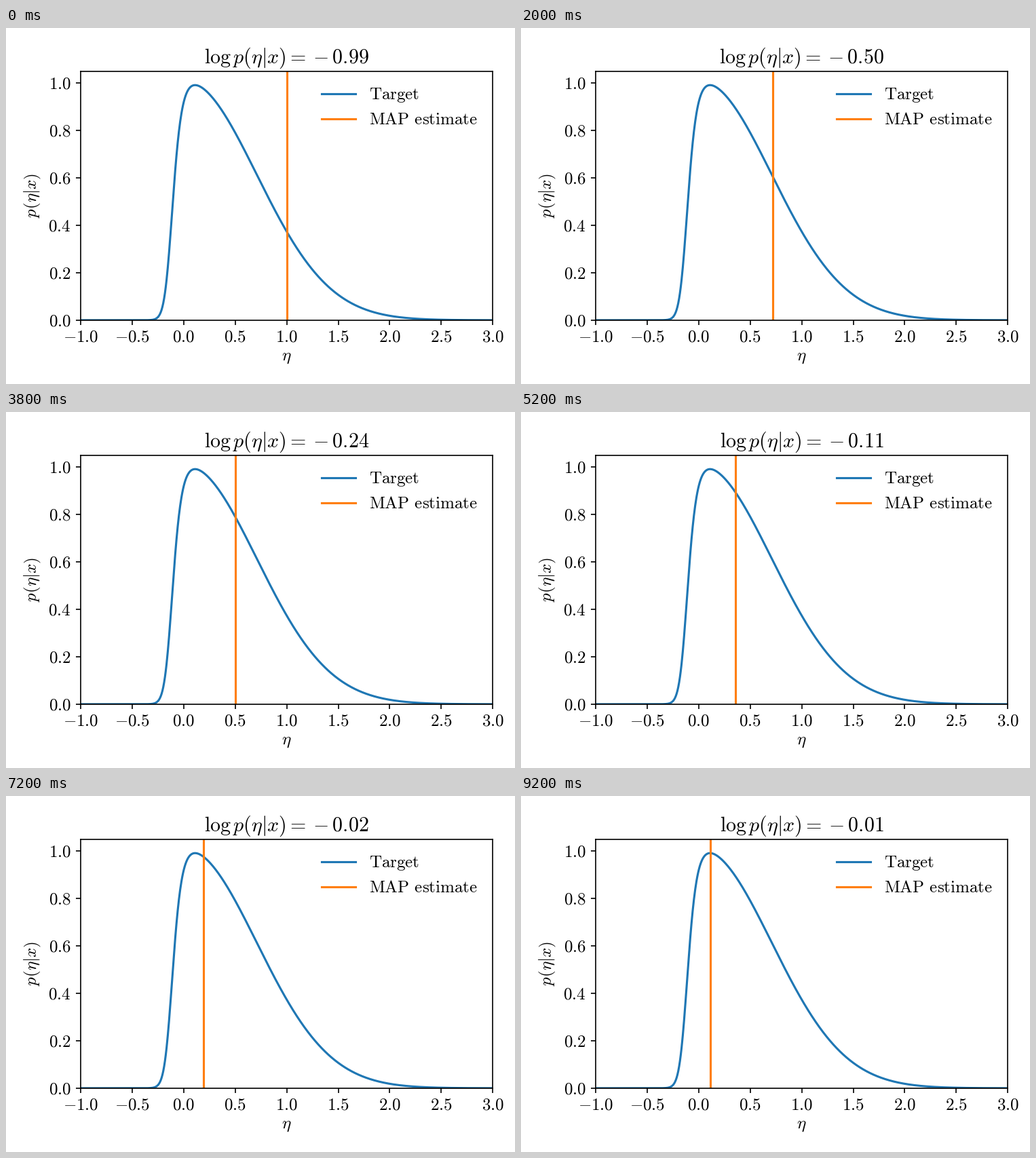
Animation of 750x525 px, one loop 10000 ms. Source, as a matplotlib script:

```python
import numpy as np
import matplotlib.pyplot as plt
from matplotlib.animation import FuncAnimation
from matplotlib.ticker import FormatStrFormatter, MultipleLocator

W, H, DPI = 750, 525, 150
FRAMES, INTERVAL = 50, 200
LEFT, RIGHT, TOP, BOTTOM = 110.2, 717.2, 63.8, 430.9

plt.rcParams.update({
    "font.family": "Liberation Serif",
    "font.size": 12,
    "mathtext.fontset": "cm",
})


def density(eta):
    """Unnormalised posterior: Gaussian prior times a squared sigmoid."""
    return np.exp(-eta**2) / (1 + np.exp(-(20 * eta + 3)))**2


grid = np.linspace(-1.5, 6, 7501)
NORM = density(grid).sum() * (grid[1] - grid[0])

# Optimiser trajectory: step number and estimate
STEPS = np.array([0, 4, 6, 10, 19, 24, 26, 36, 42, 44, 46, 49])
VALUES = np.array([1, .8835, .826, .718, .501, .396, .3555, .1915,
                   .133, .12, .1135, .1105])
SLOPES = np.gradient(VALUES, STEPS)


def estimate(k):
    """Cubic Hermite curve through the trajectory."""
    i = min(np.searchsorted(STEPS, k, side="right"), len(STEPS) - 1) - 1
    span = STEPS[i + 1] - STEPS[i]
    u = (k - STEPS[i]) / span
    blend = u * u * (3 - 2 * u)
    return (VALUES[i] * (1 - blend) + VALUES[i + 1] * blend
            + span * u * (1 - u) * (SLOPES[i] * (1 - u) - SLOPES[i + 1] * u))


def heading(eta):
    log_p = np.log(density(eta) / NORM)
    return rf"$\log p(\eta|x) = {{}}{log_p:.2f}$"


fig = plt.figure(figsize=(W / DPI, H / DPI), dpi=DPI, facecolor="white")
ax = fig.add_axes([LEFT / W, 1 - BOTTOM / H,
                   (RIGHT - LEFT) / W, (BOTTOM - TOP) / H])

x = np.linspace(-1, 3, 1000)
ax.plot(x, density(x) / NORM, color="C0", label=r"$\mathrm{Target}$")
marker = ax.axvline(VALUES[0], color="C1",
                    label=r"$\mathrm{MAP}\hspace{0.38}\mathrm{estimate}$")

ax.set_xlim(-1, 3)
ax.set_ylim(0, 1.05)
for axis, step in ((ax.xaxis, 0.5), (ax.yaxis, 0.2)):
    axis.set_major_locator(MultipleLocator(step))
    axis.set_major_formatter(FormatStrFormatter("$%.1f$"))
ax.set_xlabel(r"$\eta$", labelpad=3.6)
ax.set_ylabel(r"$p(\eta|x)$")
ax.legend(loc="upper right", frameon=False)
title = ax.set_title(heading(VALUES[0]))


def draw(k):
    eta = estimate(k)
    marker.set_xdata([eta, eta])
    title.set_text(heading(eta))
    return marker, title


anim = FuncAnimation(fig, draw, frames=FRAMES, interval=INTERVAL,
                     init_func=lambda: draw(0), repeat=True, repeat_delay=0)
plt.show()
```
